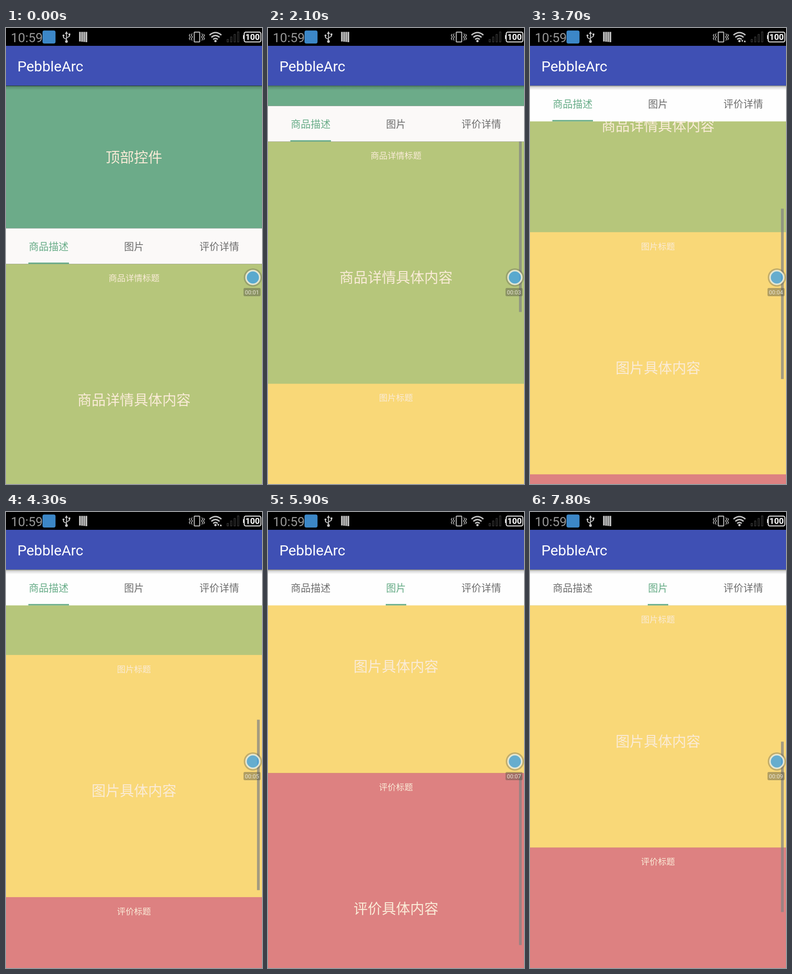
An HTML page that plays this animation: 561x998 px, repeating every 8000 ms.

```html
<!DOCTYPE html>
<html lang="zh-CN">
<head>
<meta charset="utf-8">
<title>Anchored tabs</title>
<style>
  html, body { margin: 0; width: 100%; height: 100%; overflow: hidden; background: #000; }
  svg { display: block; width: 100%; height: 100%; }
  text { font-family: "Noto Sans CJK SC", "Noto Sans CJK", sans-serif; }
  .latin { font-family: Roboto, sans-serif; }
  .mid { text-anchor: middle; }
</style>
</head>
<body>
<svg viewBox="0 0 561 998">
  <defs>
    <linearGradient id="fade" x2="0" y2="1">
      <stop offset="0" stop-color="#000" stop-opacity=".42"/>
      <stop offset=".3" stop-color="#000" stop-opacity=".16"/>
      <stop offset="1" stop-color="#000" stop-opacity="0"/>
    </linearGradient>
  </defs>

  <g id="page"></g>

  <g id="tabs">
    <rect id="tabBg" width="561" height="78"/>
    <rect id="line" y="75" height="3" fill="#65ab86"/>
  </g>

  <rect id="thumb" x="550" width="6" height="373" fill="#848484"/>

  <rect y="126" width="561" height="10" fill="url(#fade)"/>
  <rect y="39" width="561" height="87" fill="#3f50b4"/>
  <text class="latin" x="25" y="95" font-size="31.7" fill="#fff">PebbleArc</text>

  <rect width="561" height="39"/>
  <text class="latin" x="10.5" y="31" font-size="28.2" fill="#969696">10:59</text>
  <rect x="80" y="5.5" width="28.5" height="28.5" rx="4" fill="#3c87c7"/>
  <g fill="none" stroke="#c4c4c4" stroke-width="2">
    <path d="M132.5 12V29M132.5 25L126 21V17M132.5 22L139 18V15"/>
    <path d="M132.5 7L136 13H129Z" fill="#c4c4c4" stroke="none"/>
    <circle cx="132.5" cy="29.5" r="3" fill="#c4c4c4" stroke="none"/>
    <circle cx="126" cy="16.5" r="2.2" fill="#c4c4c4" stroke="none"/>
    <path d="M137 12h4v4h-4z" fill="#c4c4c4" stroke="none"/>
    <path d="M162 8.5V29.5M166.700 8.500V30M171.400 8.500V30.500M176.100 8.500V31" stroke="#bdbdbd" stroke-width="3.900"/>
    <rect x="412.5" y="9" width="12" height="21.5" rx="1"/>
    <path d="M408 12l-2 4 2.500 3.500-2.500 4 2 4M403.500 13l-2 3.500 2.500 3-2.500 3.500 2 3.500M429 12l2 4-2.500 3.500 2.500 4-2 4M433 13l2 3.500-2.500 3 2.500 3.500-2 3.500" stroke-width="1.5"/>
    <path d="M446 15.500Q459 4.500 472 15.500M450 20.500Q459 12.500 468 20.500M454 25Q459 20.500 464 25" stroke-width="3"/>
    <circle cx="459" cy="28.500" r="2.600" fill="#c4c4c4" stroke="none"/>
    <path id="traffic" d="M463 26.500h4.500L465.200 31zM468.500 31h4.500L470.700 26.500z" fill="#ddd" stroke="none"/>
    <g id="signal" stroke="#404040" stroke-width="1.2"></g>
    <rect x="522" y="9" width="36.500" height="21.500" rx="3.500" stroke="#eee"/>
    <path d="M520.500 15.500V24" stroke="#eee"/>
  </g>
  <text class="latin mid" x="540.300" y="26.300" font-size="18.500" font-weight="700" fill="#fff">100</text>

  <circle cx="541" cy="546" r="20" fill="#6c6c58" opacity=".4"/>
  <circle cx="541" cy="546" r="15" fill="#3eacf8" fill-opacity=".7" stroke="#f2f0da" stroke-opacity=".85" stroke-width="3.500"/>
  <rect x="520.500" y="569" width="37.500" height="18" rx="3" fill="#4c4c42" opacity=".42"/>
  <text id="clock" class="latin mid" x="539" y="582.500" font-size="12.500" fill="#e8e4d4"></text>
</svg>
<script>
const $ = id => document.getElementById(id);
const LOOP = 8000, STEP = 100, BAR = 126.4, TAB_Y = 438.4;

function add(parent, tag, attrs, content = '') {
  const el = document.createElementNS('http://www.w3.org/2000/svg', tag);
  for (const k in attrs) el.setAttribute(k, attrs[k]);
  el.textContent = content;
  return parent.appendChild(el);
}

// Text centred on a point
function label(parent, content, x, y, size, fill) {
  return add(parent, 'text', { class: 'mid', x, y: y + size * 0.36, 'font-size': size, fill }, content);
}

function section(y, height, fill) {
  add($('page'), 'rect', { y, width: 561, height, fill });
}

const CREAM = '#faebd7';
section(BAR, 312, '#6cab89');
label($('page'), '顶部控件', 280.5, 283, 31, CREAM);
[['商品详情', '#b6c67b'], ['图片', '#f9d878'], ['评价', '#dd8181']].forEach(([name, fill], i) => {
  const y = TAB_Y + 78 + i * 530;
  section(y, 530.5, fill);
  label($('page'), name + '标题', 280.5, y + 31, 18.6, CREAM);
  label($('page'), name + '具体内容', 280.5, y + 297, 31, CREAM);
});

const tabs = [['商品描述', 93.5, 89], ['图片', 280.5, 45], ['评价详情', 467.5, 89]]
  .map(([name, x, w]) => ({ x, w, el: label($('tabs'), name, x, 40, 21.7) }));

for (let i = 0; i < 4; i++) {
  const h = 5.5 + i * 5.5;
  add($('signal'), 'rect', { x: 484.5 + i * 7.6, y: 30.5 - h, width: 3, height: h });
}

const clamp = v => Math.min(1, Math.max(0, v));
const ease = k => k * k * (3 - 2 * k);
const mix = (a, b, k) => a + (b - a) * k;

// Time and scroll offset
const scrollKeys = [[500, 0], [700, 16], [1300, 133], [1400, 148], [2300, 302], [2900, 421],
  [4300, 733.5], [4650, 842], [4850, 866], [5400, 866], [6270, 1108], [7450, 1108], [7451, 842]];

function scrollAt(t) {
  const i = scrollKeys.findIndex(k => k[0] > t);
  if (i === 0) return 0;
  if (i < 0) return 842;
  const [t0, s0] = scrollKeys[i - 1], [t1, s1] = scrollKeys[i];
  return mix(s0, s1, (t - t0) / (t1 - t0));
}

// The scrollbar fades once a drag has rested
const drags = [[550, 4850], [5400, 6270], [7450, 7800]];
function thumbAlpha(t) {
  const last = drags.filter(d => d[0] <= t).pop();
  return last ? 1 - clamp((t - last[1] - 300) / 250) : 0;
}

// Start time, old tab, new tab
const picks = [[0, 0, 0], [4660, 0, 1], [6880, 1, 2], [7460, 2, 1]];

function draw(t) {
  const s = scrollAt(t), top = Math.max(BAR, TAB_Y - s);
  $('page').setAttribute('transform', `translate(0 ${-s})`);
  $('tabs').setAttribute('transform', `translate(0 ${top})`);
  $('tabBg').setAttribute('fill', top > BAR ? '#fbf9f8' : '#fefefe');

  const [start, from, to] = picks.filter(p => p[0] <= t).pop();
  const k = ease(clamp((t - start) / 300)), a = tabs[from], b = tabs[to];
  const w = mix(a.w, b.w, k);
  $('line').setAttribute('x', mix(a.x, b.x, k) - w / 2);
  $('line').setAttribute('width', w);
  tabs.forEach((tab, i) => tab.el.setAttribute('fill', i === to ? '#65ab86' : '#6c6c6c'));

  $('thumb').setAttribute('y', 130 + s * 0.4425);
  $('thumb').setAttribute('opacity', 0.72 * thumbAlpha(t));
  $('traffic').setAttribute('opacity', t >= 3700 && t < 4600 ? 1 : 0);
  $('clock').textContent = '00:0' + (2 + Math.floor((t - 916) / 982));
}

const begin = performance.now();
function tick() {
  const t = (performance.now() - begin) % LOOP;
  draw(Math.floor(t / STEP) * STEP);
  requestAnimationFrame(tick);
}
tick();
</script>
</body>
</html>
```
